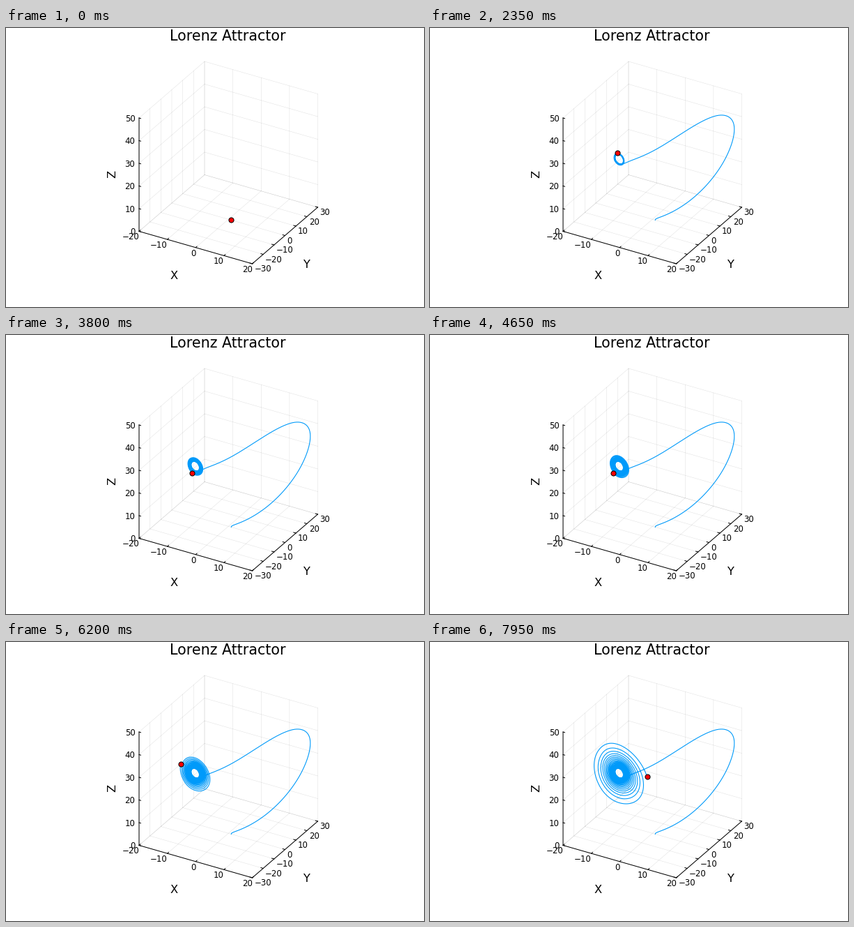
A matplotlib script for the animation above (8 s loop, 600x400 px).

```python
import numpy as np
import matplotlib.pyplot as plt
from matplotlib.animation import FuncAnimation

FRAMES, INTERVAL = 160, 50
W, H, DPI = 600, 400, 100
PT = 72 / DPI          # points per pixel
SUB = 14               # curve samples per solver step

plt.rcParams["font.family"] = "DejaVu Sans"
plt.rcParams["path.simplify"] = False
plt.rcParams["path.snap"] = False


def tableau():
    """Tsitouras 5(4) pair, derived from its free parameters and order conditions."""
    c = np.array([0, 0.161, 0.327, 0.9, 0.9800255409045097, 1])
    a = np.zeros((6, 6))
    a[2, 1], a[3, 2] = 0.335480655492357, 4.3622954328695815

    # weights from the quadrature conditions
    b = np.full(6, 0.01)
    k = np.arange(5)
    rest = [0, 2, 3, 4, 5]
    b[rest] = np.linalg.solve(c[rest] ** k[:, None], 1 / (k + 1) - b[1] * c[1] ** k)

    # d = a @ c
    d = np.zeros(6)
    d[2] = a[2, 1] * c[1]
    k = np.arange(3)
    d[3:] = np.linalg.solve(b[3:] * c[3:] ** k[:, None],
                            0.5 / (k + 3) - b[2] * c[2] ** k * d[2])

    # the other entries follow from conditions that are linear in them
    slots = [(i, j) for i in range(3, 6) for j in range(1, i) if (i, j) != (3, 2)]

    def residual(values):
        for slot, v in zip(slots, values):
            a[slot] = v
        return np.concatenate([(a @ c - d)[3:], (b @ a - b * (1 - c))[1:5],
                               [b * c @ a @ c ** 2 - 1 / 15, b * c @ a @ d - 1 / 30]])

    base = residual(np.zeros(len(slots)))
    jac = np.array([residual(e) - base for e in np.eye(len(slots))]).T
    residual(np.linalg.lstsq(jac, -base, rcond=None)[0])
    a[:, 0] = c - a.sum(axis=1)

    # error weights vanish on every condition up to order four
    full = np.zeros((7, 7))
    full[:6, :6], full[6, :6] = a, b
    c = np.append(c, 1)
    d = full @ c
    conds = [c ** 0, c, c ** 2, c ** 3, d, c * d, full @ c ** 2, full @ d]
    err = np.linalg.svd(np.array(conds))[2][-1]
    return full, err / err[-1] / 66


def lorenz(u):
    x, y, z = u
    return np.array([10 * (y - x), x * (28 - z) - y, x * y - 8 / 3 * z])


def solve(u, count, h=3.56786e-5, rtol=1e-3, atol=1e-6):
    """Adaptive steps with a PI controller; returns step sizes, states, slopes."""
    a, weights = tableau()
    hs, us, fs = [], [u], [lorenz(u)]
    prev = 1e-4
    while len(hs) < count:
        k = [fs[-1]]
        for i in range(1, 7):
            new = u + h * np.dot(a[i, :i], k)
            k.append(lorenz(new))
        scale = atol + rtol * np.maximum(abs(u), abs(new))
        err = np.sqrt(np.mean((h * weights @ np.array(k) / scale) ** 2))
        q = max(err, 1e-30) ** 0.14
        if err > 1:
            h /= min(5, q / 0.9)
            continue
        hs.append(h)
        us.append(new)
        fs.append(k[-1])
        u = new
        h /= np.clip(q / prev ** 0.08 / 0.9, 0.1, 5)
        prev = max(err, 1e-4)
    return hs, us, fs


def project(x, y, z):
    a, b, c = (x + 20) / 40, (y + 30) / 60, z / 50
    return (191 + 162.5 * a + 94 * b,
            291.5 + 46.5 * a - 81 * b - 162.5 * c)


def trajectory():
    hs, us, fs = solve(np.array([1.0, 0.0, 0.0]), FRAMES)
    s = np.linspace(0, 1, SUB + 1)[1:, None]
    pts = [us[0][None]]
    for h, u0, u1, f0, f1 in zip(hs, us, us[1:], fs, fs[1:]):
        pts.append((1 + 2 * s) * (1 - s) ** 2 * u0 + s * (1 - s) ** 2 * h * f0
                   + s ** 2 * (3 - 2 * s) * u1 + s ** 2 * (s - 1) * h * f1)
    return project(*np.concatenate(pts).T)


fig = plt.figure(figsize=(W / DPI, H / DPI), dpi=DPI, facecolor="white")
ax = fig.add_axes([0, 0, 1, 1])
ax.set_xlim(0, W)
ax.set_ylim(H, 0)
ax.axis("off")


def segment(p, q, width=1.0, **style):
    (x0, y0), (x1, y1) = project(*p), project(*q)
    ax.plot([x0, x1], [y0, y1], lw=width * PT, color="black", snap=False, **style)


def grid(p, q):
    segment(p, q, 0.5, alpha=0.12)


def label(x, y, text, size, ha="center", va="baseline", **style):
    ax.text(x, y, text, fontsize=size * PT, ha=ha, va=va, **style)


def tick(start, end, value, dx, dy, ha):
    segment(start, end)
    x, y = project(*start)
    label(x + dx, y + dy, str(value).replace("-", "\u2212"), 11.8, ha)


XT, YT, ZT = range(-20, 21, 10), range(-30, 31, 10), range(0, 51, 10)

for x in XT:
    grid((x, -30, 0), (x, 30, 0))
    grid((x, 30, 0), (x, 30, 50))
    tick((x, -30, 0), (x, -28.8, 0), x, 0, 11.8, "right")
for y in YT:
    grid((-20, y, 0), (20, y, 0))
    grid((-20, y, 0), (-20, y, 50))
    tick((20, y, 0), (19.2, y, 0), y, 3, 11.3, "left")
for z in ZT:
    grid((-20, -30, z), (-20, 30, z))
    grid((-20, 30, z), (20, 30, z))
    tick((-20, -30, z), (-19.4, -30, z), z, -5.6, 4.7, "right")

segment((-20, -30, 0), (20, -30, 0))
segment((20, -30, 0), (20, 30, 0))
segment((-20, -30, 0), (-20, -30, 50))

label(318.8, 18.3, "Lorenz Attractor", 20.7)
label(241.3, 360.3, "X", 16.2)
label(431.2, 343.6, "Y", 16.2)
label(152.6, 209.7, "Z", 16.2, va="center", rotation=90)

PX, PY = trajectory()
curve, = ax.plot([], [], color="#009afa", lw=1.1 * PT,
                 solid_joinstyle="round", zorder=5)
dot, = ax.plot([], [], "o", ms=7.1 * PT, mfc="red", mec="black",
               mew=1.0 * PT, snap=False, zorder=6)


def draw(i):
    end = i * SUB
    curve.set_data(PX[:end + 1], PY[:end + 1])
    dot.set_data([PX[end]], [PY[end]])
    return curve, dot


anim = FuncAnimation(fig, draw, frames=FRAMES, interval=INTERVAL,
                     init_func=lambda: draw(0), repeat=True, repeat_delay=0)
plt.show()
```
